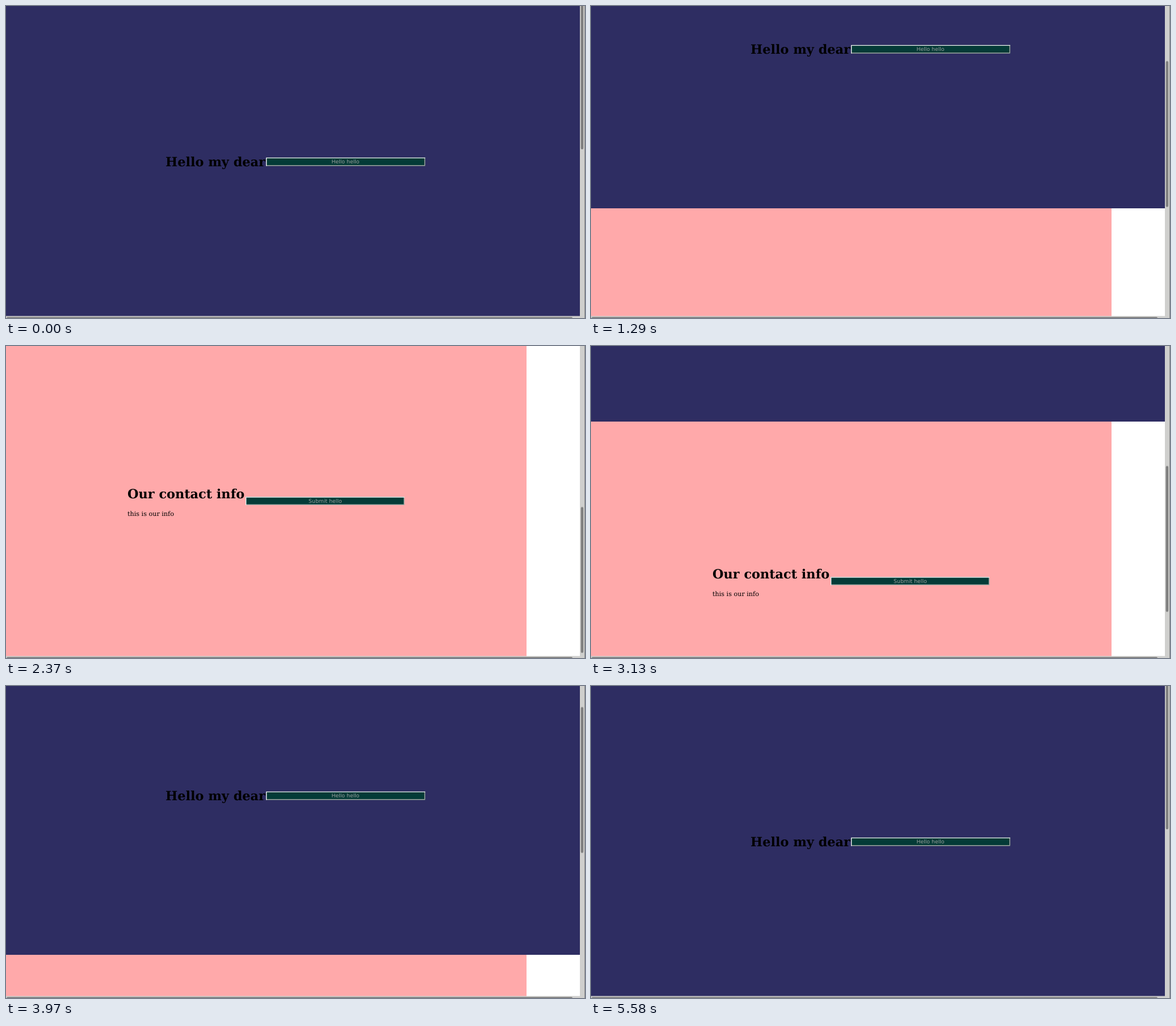
An HTML page for the animation above (5840 ms loop, 1020 px wide and 549 px high).

```html
<!DOCTYPE html>
<html lang="en">
<head>
<meta charset="utf-8">
<title>Scrolling page</title>
<style>
  html, body { margin: 0; width: 100%; height: 100%; overflow: hidden; background: #fff; }
  svg { display: block; width: 1020px; height: 549px; }
  text { text-rendering: geometricPrecision; white-space: pre; }
  .title { font: bold 22.4px "DejaVu Serif", serif; }
  .note { font: 11.2px "DejaVu Serif", serif; }
  .label { font: 9.333px "DejaVu Sans", sans-serif; fill: #9c9f9d; text-anchor: middle; }
  .face { fill: #043b37; }
  .edge { fill: none; stroke-width: 1.4; }
  .lit { stroke: #f2f2f2; }
  .shade { stroke: #a3a8a4; }
</style>
</head>
<body>
<svg viewBox="0 0 1020 549">
  <g id="page">
    <rect y="-20" width="1011" height="574" fill="#2e2d62"/>
    <rect y="554" width="917" height="600" fill="#ffa9aa"/>
    <text class="title" x="281" y="282">Hello my dear</text>
    <g id="hello" transform="translate(458 266.7)">
      <rect class="face" width="280.4" height="14.8"/>
      <path class="edge shade" d="M0 14.1H279.7V0"/>
      <path class="edge lit" d="M.7 14.8V.7H280.4"/>
      <text class="label" x="140" y="10.6">Hello hello</text>
    </g>
    <text class="title" x="214" y="830">Our contact info</text>
    <text class="note" x="214" y="861">this is our info</text>
    <g transform="translate(422 827.3)">
      <rect class="face" width="280" height="14.6"/>
      <path class="edge shade" d="M0 13.9H279.3V0"/>
      <path class="edge lit" d="M.7 14.6V.7H280"/>
      <text class="label" x="140.4" y="10.6">Submit hello</text>
    </g>
  </g>

  <!-- scrollbars -->
  <rect x="1011" width="9" height="549" fill="#cfcfcd"/>
  <rect y="545.5" width="1020" height="3.5" fill="#cfcfcd"/>
  <rect x="1019" width="1" height="549" fill="#8a8a8a"/>
  <rect x="1" y="547.3" width="997" height="5" rx="2" fill="#7f7f7f"/>
  <rect id="thumb" x="1012.7" y="-4.5" width="4.4" height="256.7" rx="2.2" fill="#7f7f7f"/>
</svg>
<script>
  const LOOP = 5840;
  const THUMB_RATIO = 0.512;

  // Scroll gestures: [start ms, end ms, scroll offset after each step]
  const gestures = [
    [890, 1680, [8, 42, 88, 130, 167, 198, 221, 238, 249, 256, 260]],
    [1830, 2440, [316, 386, 441, 483, 514, 537, 552, 562, 569]],
    [2970, 3590, [552, 492, 421, 350, 289, 241, 205, 180, 165]],
    [3800, 4310, [150, 116, 81, 51, 28, 12, 4, 0]]
  ];

  const scrollSteps = [[0, 0]];
  for (const [start, end, offsets] of gestures) {
    const gap = (end - start) / (offsets.length - 1);
    offsets.forEach((offset, i) =>
      scrollSteps.push([Math.round((start + i * gap) / 10) * 10, offset]));
  }

  function play(element, property, steps, format = v => v) {
    const frames = [...steps, [LOOP, steps[steps.length - 1][1]]].map(([time, value]) => ({
      offset: time / LOOP,
      [property]: format(value),
      easing: "steps(1, end)"
    }));
    element.animate(frames, { duration: LOOP, iterations: Infinity });
  }

  const find = selector => document.querySelector(selector);
  play(find("#page"), "transform", scrollSteps, y => `translate(0px, ${-y}px)`);
  play(find("#thumb"), "transform", scrollSteps, y => `translate(0px, ${y * THUMB_RATIO}px)`);

  // Brief press of the first button swaps its bevel
  const press = (up, down) => [[0, up], [5520, down], [5580, up]];
  play(find("#hello .lit"), "stroke", press("#f2f2f2", "#a3a8a4"));
  play(find("#hello .shade"), "stroke", press("#a3a8a4", "#f2f2f2"));
</script>
</body>
</html>
```
